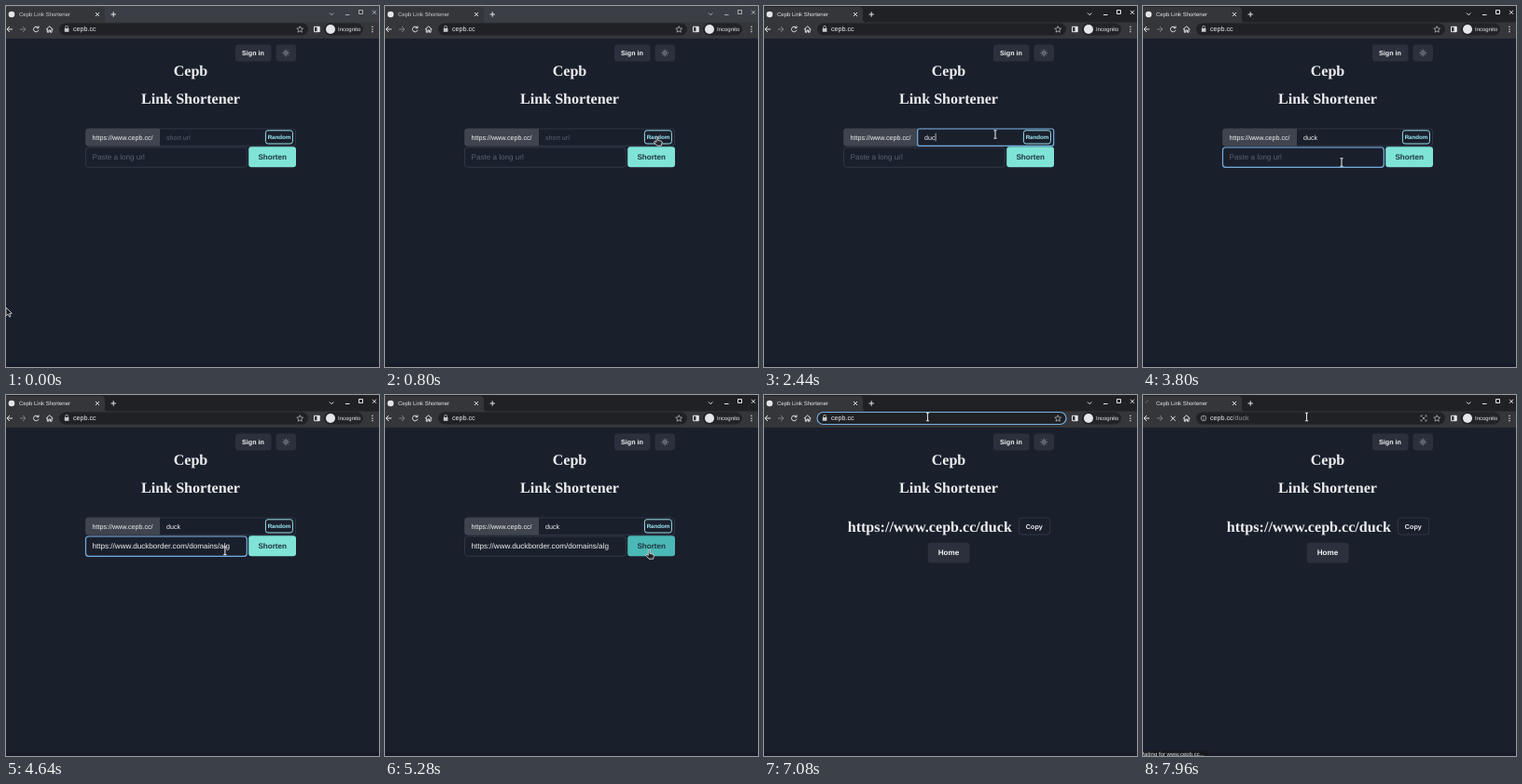
These frames come from a looping animation (400x388 px, 8 s). An HTML page:

```html
<!DOCTYPE html>
<html lang="en">
<head>
<meta charset="utf-8">
<title>Link shortener demo</title>
<style>
  html, body { margin: 0; width: 100%; height: 100%; overflow: hidden; background: #1a1f2c; }
  svg { display: block; width: 100%; height: 100%; }
  text { font-family: "Liberation Sans", Arial, sans-serif; font-size: 7.15px; fill: #f1f2f4; white-space: pre; text-rendering: geometricPrecision; }
  .serif { font: bold 16.1px "Liberation Serif", "Times New Roman", serif; fill: #eceeef; }
  .mid { text-anchor: middle; }
  .bold { font-weight: bold; }
  .big { font-size: 8.12px; }
  .ui { font-size: 6px; fill: #e8eaed; }
  .hint { fill: #596070; }
  .button { fill: #2b303c; }
  .field { fill: none; stroke: #3a4150; stroke-width: .7; }
  .focus { fill: none; stroke: #74aee0; stroke-width: 1.2; }
  .line { fill: none; stroke: #e4e6e9; stroke-width: 1; }
  .thin { fill: none; stroke: #c6c9ce; stroke-width: .7; }
</style>
</head>
<body>
<svg viewBox="0 0 400 388" preserveAspectRatio="none">
  <rect width="400" height="388" fill="#1a1f2c"/>
  <rect y="384" width="400" height="4" fill="#171b27"/>

  <!-- Browser frame -->
  <rect id="strip" width="400" height="18"/>
  <path d="M0 1H102Q106 1 106 5V14Q106 17.500 109 17.500H400V35H0Z" fill="#35363a"/>
  <circle id="favicon" cx="6" cy="9" r="3.300" fill="#e4e6e9"/>
  <path id="spinner" class="thin" d="M3 9A3 3 0 0 1 6 6" stroke-opacity=".4"/>
  <text class="ui" x="14" y="11.200" id="tabTitle"></text>
  <path class="line" d="M96 7l4 4m0-4l-4 4M112.500 9h5.400M115.200 6.300v5.400" stroke-width=".9"/>
  <path id="controls" class="line" d="M347 7.500l2.200 2.200l2.200-2.200M364 9.500h4.500M378.500 4.500h4v4h-4zM393 4.800l4 4m0-4l-4 4"/>

  <path class="line" d="M7 25H1M4 22L1 25L4 28"/>
  <path class="line" d="M15 25h6M18 22l3 3l-3 3" style="stroke:#7c7f84"/>
  <path id="reload" class="line" d="M34.300 23A2.800 2.800 0 1 0 35 25.800M35 21.500V23.700H32.700"/>
  <path id="stop" class="line" d="M29.700 22.700l5 5m0-5l-5 5"/>
  <path class="line" d="M43 25.200L46.700 21.800L50.400 25.200M44.300 24.500V28.200H45.900V26H47.500V28.200H49.100V24.500"/>

  <rect x="57" y="18.500" width="267" height="13" rx="6.500" fill="#202124"/>
  <rect id="omniFocus" class="focus" x="57" y="18.500" width="267" height="13" rx="6.500"/>
  <g id="lock">
    <rect x="62.800" y="24" width="4.600" height="3.800" fill="#c6c9ce"/>
    <path class="thin" d="M63.700 24V22.700A1.400 1.400 0 0 1 66.500 22.700V24"/>
  </g>
  <g id="info">
    <circle class="thin" cx="65" cy="25" r="2.800"/>
    <path class="thin" d="M65 24.600V26.800M65 23.200v.7"/>
  </g>
  <text x="72" y="27.300"><tspan id="host"></tspan><tspan id="path" fill="#92969c"></tspan></text>
  <path id="pageAction" class="thin" d="M298 23.500V22h1.500M302.500 22H304V23.500M304 26.500V28H302.500M299.500 28H298V26.500M299.500 23.500l3 3m0-3l-3 3"/>
  <path class="thin" d="M315.200 21.700l1 2.200l2.400.3l-1.800 1.600l.5 2.400l-2.100-1.200l-2.100 1.200l.5-2.400l-1.800-1.600l2.400-.3z"/>
  <path class="line" d="M330.500 22.300h5.500v5.400h-5.500z"/>
  <rect x="333.500" y="22" width="3" height="6" fill="#e4e6e9"/>
  <rect x="341" y="18.500" width="42" height="13" rx="6.500" fill="#222326"/>
  <circle cx="348" cy="25" r="5" fill="#e4e6e9"/>
  <text class="ui" x="356" y="27.200">Incognito</text>
  <path d="M392.300 21.800h1.300v1.300h-1.300zM392.300 24.400h1.300v1.300h-1.300zM392.300 27h1.300v1.300h-1.300z" fill="#dfe1e4"/>

  <!-- Page header -->
  <rect class="button" x="246" y="41.500" width="38.500" height="18" rx="3"/>
  <text class="mid bold" x="265" y="53">Sign in</text>
  <rect class="button" x="289.500" y="41.500" width="21.500" height="18" rx="3"/>
  <circle class="thin" cx="300.200" cy="50.500" r="1.500"/>
  <g id="rays"></g>
  <text class="serif mid" x="198" y="74.700" id="brand"></text>
  <text class="serif mid" x="198" y="105">Link Shortener</text>

  <g id="form">
    <rect class="field" x="85.500" y="132" width="225" height="18.300" rx="3"/>
    <path d="M165 131.700V150.500H88.500Q85.300 150.500 85.300 147.500V134.700Q85.300 131.700 88.500 131.700Z" fill="#3f444e"/>
    <text x="92.500" y="143.500" id="prefix"></text>
    <text x="172" y="143.500" id="short"></text>
    <rect id="caret" y="136.800" width=".7" height="8.400" fill="#e9ebee"/>
    <rect id="shortFocus" class="focus" x="164.700" y="132" width="146" height="18.300" rx="2"/>
    <rect x="278.400" y="133.800" width="29" height="14.200" rx="2.500" fill="#1a1f2c" stroke="#98dfe8"/>
    <text class="mid bold" x="293" y="143.200" style="font-size:6.2px;fill:#9decf9">Random</text>
    <rect class="field" x="85.500" y="152" width="172.800" height="21.300" rx="3"/>
    <rect id="longFocus" class="focus" x="85.500" y="152" width="172.800" height="21.300" rx="3"/>
    <text class="big" x="92.500" y="165.300" id="long"></text>
    <rect id="shorten" x="260.200" y="151.300" width="50.800" height="22" rx="3"/>
    <text class="big mid bold" x="285.700" y="165.300" style="fill:#1f3440">Shorten</text>
  </g>

  <g id="result">
    <text class="serif" x="89.700" y="147" id="link"></text>
    <rect id="copy" x="273.300" y="132" width="33.300" height="18" rx="3" stroke="#3a4150" stroke-width=".7"/>
    <text class="mid bold" x="289.800" y="143.500">Copy</text>
    <rect class="button" x="175.700" y="158.800" width="44.800" height="21.800" rx="3"/>
    <text class="big mid bold" x="198" y="172.300">Home</text>
  </g>

  <g id="status">
    <path d="M0 382.500H67Q69 382.500 69 384.500V388H0Z" fill="#16181c"/>
    <text class="ui" x="-4.500" y="388.200" id="statusText"></text>
  </g>

  <g id="pointer" stroke-linejoin="round">
    <path id="arrow" d="M0 0V9L2.100 7.200L3.600 10.200L5 9.500L3.600 6.600L6.300 6.300Z" fill="#16181d" stroke="#e8e8e8" stroke-width=".8"/>
    <path id="beam" d="M-1.600-4.300H1.600M0-4.300V4.300M-1.600 4.300H1.600" fill="none" stroke="#dfe1e4" stroke-width="1.100"/>
    <path id="hand" d="M0 .8Q.8-.5 1.600 .8V4.300L5.600 5.300Q6.400 5.700 6 7.200L5.300 10.200H.7L-2.600 6.300Q-2.300 5-1 5.700L0 6.300Z" fill="#24262b" stroke="#e8e8e8" stroke-width=".8"/>
  </g>
</svg>
<script>
const LOOP = 8000;
const HOST = "cepb.cc", SLUG = "duck", PREFIX = "https://www." + HOST + "/";
const LONG_URL = "https://www.duckborder.com/domains/alg";
const $ = id => document.getElementById(id);
const show = (id, on) => { $(id).style.display = on ? "" : "none"; };
const write = (id, text) => { if ($(id).textContent !== text) $(id).textContent = text; };

write("tabTitle", "Cepb Link Shortener");
write("brand", "Cepb");
write("prefix", PREFIX);
write("link", PREFIX + SLUG);
write("statusText", "Waiting for www." + HOST + "...");
$("rays").innerHTML = Array.from({ length: 8 }, (_, i) =>
  `<path class="thin" d="M300.200 47.900v-1.100" transform="rotate(${i * 45} 300.200 50.500)"/>`).join("");

// Pointer stops: time, x, y
const STOPS = [
  [0, 0, 324], [120, 0, 324], [760, 291, 140], [1120, 291, 140], [1440, 261, 139],
  [1720, 248, 138], [2800, 248, 138], [3240, 213, 168], [4450, 213, 168],
  [4960, 282.3, 166], [5750, 282.3, 166], [6080, 288.7, 139], [6380, 288.7, 139],
  [6680, 175.5, 23.5], [LOOP, 175.5, 23.5]
];

function pointerAt(t) {
  const i = STOPS.findIndex(stop => stop[0] > t);
  const [t0, x0, y0] = STOPS[i - 1], [t1, x1, y1] = STOPS[i];
  const p = (t - t0) / (t1 - t0), ease = p * p * (3 - 2 * p);
  return [x0 + (x1 - x0) * ease, y0 + (y1 - y0) * ease];
}

function shortText(t) {
  if (t < 900) return "";
  if (t < 1950) return "eCNvZ";
  return SLUG.slice(0, [2180, 2300, 2420, 2600].filter(key => t >= key).length);
}

function draw(t) {
  const [x, y] = pointerAt(t);
  const inside = (x0, y0, x1, y1) => x >= x0 && x <= x1 && y >= y0 && y <= y1;
  const active = t >= 900, finished = t >= 5650, loading = t >= 7580;
  const omniFocus = t >= 6720 && !loading, pasted = t >= 7100;

  $("strip").setAttribute("fill", active ? "#202124" : "#3c3e46");
  $("controls").style.opacity = active ? 1 : .65;
  $("tabTitle").style.opacity = active ? 1 : .85;
  show("favicon", !loading);
  show("spinner", loading);
  $("spinner").setAttribute("transform", `rotate(${(t - 7960) * .36} 6 9)`);
  show("reload", !loading);
  show("stop", loading);
  show("lock", !pasted);
  show("info", pasted);
  show("omniFocus", omniFocus);
  show("pageAction", loading);
  show("status", t >= 7640);
  write("host", pasted && !loading ? PREFIX + SLUG : HOST);
  write("path", loading ? "/" + SLUG : "");

  show("form", !finished);
  show("result", finished);
  const short = shortText(t), shortFocus = t >= 1780 && t < 3280;
  write("short", short || "short url");
  $("short").setAttribute("class", short ? "" : "hint");
  show("shortFocus", shortFocus);
  show("caret", shortFocus && (t < 2700 || t % 1000 < 500));
  if (!finished) $("caret").setAttribute("x", 172.2 + (short ? $("short").getComputedTextLength() : 0));
  const hasLong = t >= 4440;
  write("long", hasLong ? LONG_URL : "Paste a long url");
  $("long").setAttribute("class", hasLong ? "big" : "big hint");
  show("longFocus", t >= 3280 && t < 5200);

  const overShorten = !finished && inside(260, 151, 311, 174);
  const overCopy = finished && inside(273, 132, 307, 150);
  const overRandom = !finished && inside(278, 134, 308, 148);
  $("shorten").setAttribute("fill", overShorten ? "#4bb9b6" : "#7fe4d7");
  $("copy").setAttribute("fill", overCopy ? "#2f343f" : "#1a1f2c");

  const hand = overShorten || overCopy || overRandom;
  const beam = !hand && (inside(57, 18, 324, 32) ||
    !finished && (inside(165, 132, 311, 150) || inside(85, 152, 258, 173)));
  show("hand", hand);
  show("beam", beam);
  show("arrow", !hand && !beam);
  $("pointer").setAttribute("transform", `translate(${x} ${y})`);
}

function tick() {
  draw(performance.now() % LOOP);
  requestAnimationFrame(tick);
}
tick();
</script>
</body>
</html>
```
